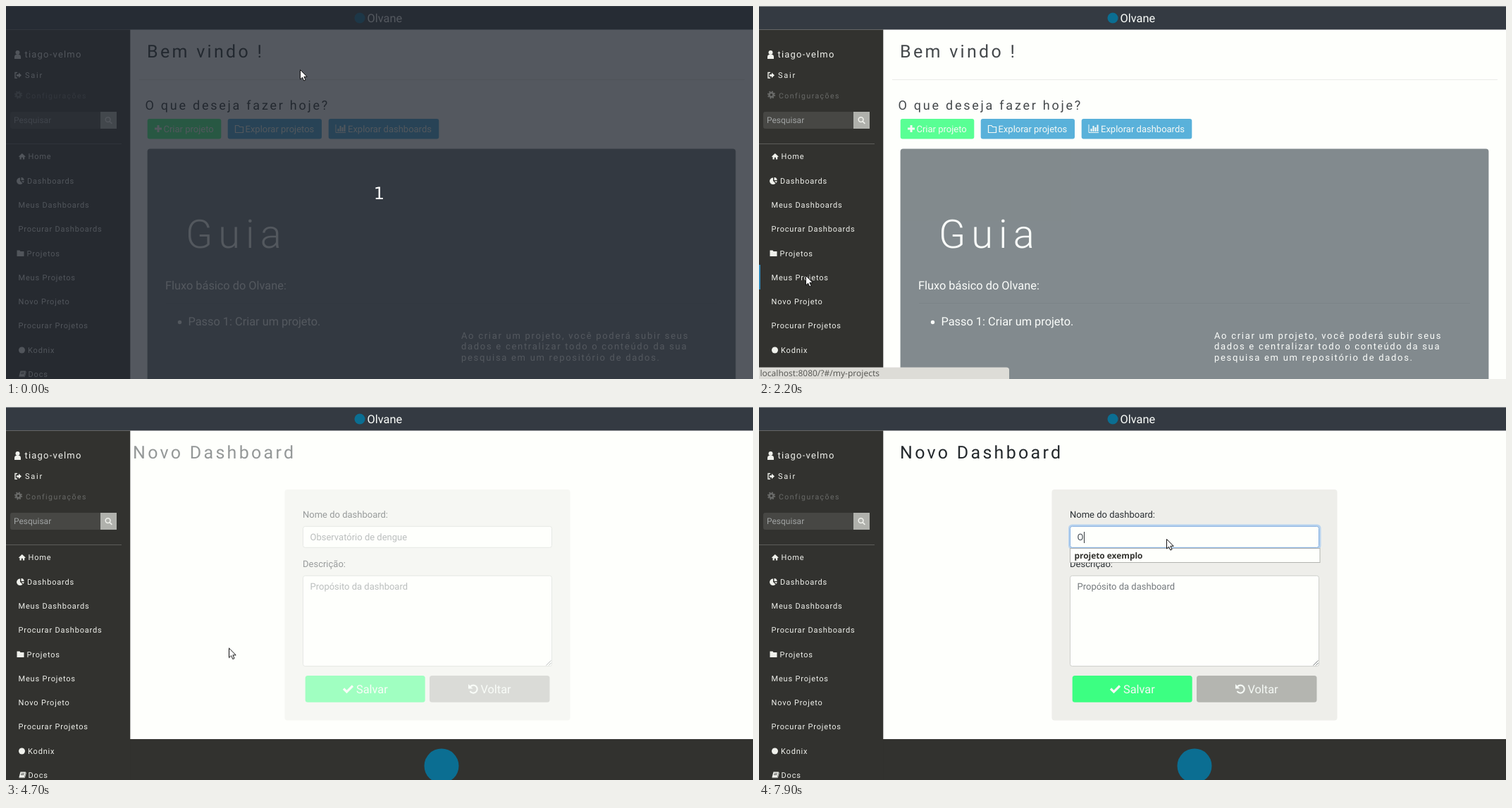
Write an HTML page that moves like this. It is 1060x529 px and loops after 8000 ms.

```html
<!DOCTYPE html>
<html lang="pt">
<head>
<meta charset="utf-8">
<title>Olvane</title>
<style>
html, body { margin: 0; width: 100%; height: 100%; overflow: hidden; background: #fefffc; }
svg { display: block; width: 1060px; height: 529px; }
text { font: 13px Roboto, sans-serif; white-space: pre; text-rendering: geometricPrecision; }

.title { font-size: 25px; letter-spacing: 3.3px; fill: #23282c; }
.sub { font-size: 18px; letter-spacing: 2.75px; fill: #23282c; }
.guide { font-size: 56px; font-weight: 350; letter-spacing: 8px; }
.lead { font-size: 16.35px; }
.note { letter-spacing: 1.71px; }
.small { font-size: 11.375px; }
.head { font-size: 15.5px; letter-spacing: 2.15px; fill: #23282c; }
.nav text { font-size: 11px; letter-spacing: .82px; }
.status text { font: 12px "Noto Sans", sans-serif; fill: #5b5b57; }
.hint { fill: #74797d; }
.body { fill: #2b3034; }
.rule { stroke: #e8e9e5; }
.light { fill: #f4f8f4; color: #f4f8f4; }
.blue { fill: #3ca3d4; }
.green { fill: #3cff82; }
.edit { fill: var(--edit, #3ca3d4); }
.make { fill: var(--make, #3ca3d4); }

/* one loop is 8 s, so 100 ms is 1.25% */
.a { animation: 8s step-end infinite; }
.dim { animation-name: dim; }
.cursor { animation-name: cursor; }
.home { animation-name: home; }
.list { animation-name: list; }
.form { animation-name: form; }
.footer { animation-name: footer; }
.bar { animation-name: bar; }
.status { animation-name: status; }
.urlA { animation-name: urlA; }
.urlB { animation-name: urlB; }
.urlC { animation-name: urlC; }
.first { animation-name: hover; }
.focus { animation-name: focus; }
.drop { animation-name: drop; }
.caret { animation-name: caret; }
.ghost { animation-name: ghost; }
.typed { animation-name: typed; }

@keyframes dim { 0% { opacity: 1 } 3.75% { opacity: .75 } 5% { opacity: .5 } 6.25% { opacity: .25 } 7.5%, 100% { opacity: 0 } }
@keyframes home { 0% { opacity: 1 } 27.5% { opacity: .85 } 32.5%, 100% { opacity: 0 } }
@keyframes list {
  0% { opacity: 0 }
  32.5% { opacity: .2; transform: translateX(-28px) }
  33.75% { opacity: .5; transform: translateX(-18px) }
  35% { opacity: .78; transform: translateX(-8.3px) }
  36.25% { opacity: .94; transform: translateX(-2px) }
  37.5% { opacity: 1; transform: none }
  56.25% { opacity: .6; transform: none }
  57.5%, 100% { opacity: 0 }
}
@keyframes form {
  0% { opacity: 0 }
  57.5% { opacity: .18; transform: translateX(-30px) }
  58.75% { opacity: .48; transform: translateX(-20px) }
  60% { opacity: .78; transform: translateX(-8px) }
  61.25% { opacity: .94; transform: translateX(-2px) }
  62.5%, 100% { opacity: 1; transform: none }
}
@keyframes footer { 0% { opacity: 0 } 57.5%, 100% { opacity: 1 } }
@keyframes bar {
  0% { opacity: 0 }
  15% { opacity: 1; transform: translateY(402px) }
  22.5% { opacity: 1; transform: translateY(367px) }
  37.5%, 100% { opacity: 0 }
}
@keyframes status {
  0% { opacity: 0 } 16.25% { opacity: .45 } 17.5% { opacity: .8 } 18.75% { opacity: .95 } 20% { opacity: 1 }
  37.5% { opacity: .5 } 38.75% { opacity: 0 } 42.5% { opacity: 1 } 56.25%, 100% { opacity: 0 }
}
@keyframes urlA { 0% { opacity: 1 } 27.5%, 100% { opacity: 0 } }
@keyframes urlB { 0% { opacity: 0 } 27.5% { opacity: 1 } 40%, 100% { opacity: 0 } }
@keyframes urlC { 0% { opacity: 0 } 40%, 100% { opacity: 1 } }
@keyframes hover {
  0% { --edit: #3ca3d4; --make: #3ca3d4 }
  41.25% { --edit: #2a779d; --make: #3ca3d4 }
  42.5% { --edit: #338db9; --make: #338db9 }
  43.75%, 100% { --edit: #3ca3d4; --make: #2a779d }
}
@keyframes focus { 0% { opacity: 0 } 72.5% { opacity: .6 } 73.75%, 100% { opacity: 1 } }
@keyframes drop { 0% { opacity: 0 } 75%, 100% { opacity: 1 } }
@keyframes caret {
  0% { opacity: 0 } 72.5% { opacity: 1 } 80% { opacity: 0 } 87.5% { opacity: 1 } 95% { opacity: 0; transform: none }
  98.75%, 100% { opacity: 1; transform: translateX(9px) }
}
@keyframes ghost { 0% { opacity: 1 } 98.75%, 100% { opacity: 0 } }
@keyframes typed { 0% { opacity: 0 } 98.75%, 100% { opacity: 1 } }
@keyframes cursor {
  0% { transform: translate(417px, 90px) }
  3.75% { transform: translate(400px, 110px) }
  5% { transform: translate(370px, 150px) }
  6.25% { transform: translate(335px, 190px) }
  7.5% { transform: translate(305px, 226px) }
  10% { transform: translate(280px, 250px) }
  11.25% { transform: translate(236px, 292px) }
  12.5% { transform: translate(188px, 333px) }
  13.75% { transform: translate(138px, 370px) }
  15% { transform: translate(98px, 402px) }
  16.25% { transform: translate(70px, 418px) }
  17.5% { transform: translate(59.5px, 421.5px) }
  21.25% { transform: translate(60px, 413px) }
  22.5% { transform: translate(63px, 397px) }
  23.75% { transform: translate(65px, 386px) }
  25% { transform: translate(66px, 382px) }
  32.5% { transform: translate(69px, 381px) }
  33.75% { transform: translate(78px, 380px) }
  35% { transform: translate(91.5px, 378.5px) }
  36.25% { transform: translate(115px, 375px) }
  37.5% { transform: translate(155px, 367px) }
  38.75% { transform: translate(198px, 357px) }
  40% { transform: translate(232px, 348px) }
  41.25% { transform: translate(260px, 341px) }
  42.5% { transform: translate(284px, 337px) }
  43.75% { transform: translate(294px, 338px) }
  45% { transform: translate(302px, 339px) }
  46.25% { transform: translate(308px, 340px) }
  47.5% { transform: translate(312px, 341px) }
  48.75% { transform: translate(315px, 341.5px) }
  50% { transform: translate(316px, 341.5px) }
  62.5% { transform: translate(319px, 340px) }
  63.75% { transform: translate(330px, 334px) }
  65% { transform: translate(352px, 322px) }
  66.25% { transform: translate(382px, 304px) }
  67.5% { transform: translate(497px, 234px) }
  70% { transform: translate(522px, 214px) }
  71.25% { transform: translate(542px, 200px) }
  72.5% { transform: translate(553px, 194px) }
  75% { transform: translate(556px, 193px) }
  77.5% { transform: translate(557px, 198px) }
  80% { transform: translate(561px, 197px) }
  81.25% { transform: translate(566px, 194px) }
  82.5% { transform: translate(571px, 190px) }
  83.75% { transform: translate(574px, 188px) }
  85% { transform: translate(576px, 187px) }
  87.5%, 100% { transform: translate(578px, 187px) }
}
</style>
</head>
<body>
<svg viewBox="0 0 1060 529">
  <defs>
    <!-- icons sit in a 12 by 12 box -->
    <g id="search" fill="none" stroke="currentColor" stroke-width="1.7"><circle cx="5" cy="5" r="3.7"/><path d="M7.7 7.7 11.3 11.3"/></g>
    <path id="pencil" fill="currentColor" d="M1 11 1.6 8 8 1.6 10.4 4 4 10.4ZM8.7 1 9.6.2 11.8 2.4 11 3.3Z"/>
    <path id="folder" fill="currentColor" d="M0 2H4L5 3.5H10V10.5H0Z"/>
    <g id="trash" fill="currentColor"><path d="M0 2H3L4 .5H6L7 2H10V3.2H0Z"/><path d="M1 4H9V11.5H1ZM2.8 5V10.3H3.6V5ZM4.6 5V10.3H5.4V5ZM6.4 5V10.3H7.2V5Z" fill-rule="evenodd"/></g>
    <g id="card">
      <rect x="189" y="236.5" width="428.5" height="162.500" rx="3" fill="none" stroke="#dcddd9"/>
      <path d="M201.500 237H604.700V276H201.500Z" fill="#f6f6f3"/>
      <path d="M201.500 276.5H604.700" stroke="#dadbd7"/>
      <text class="head" x="217" y="262.5">projeto exemplo</text>
      <text class="body" x="217.5" y="307">sua descrição aqui</text>
      <rect class="edit" x="218" y="326" width="54.5" height="24.5" rx="2.5"/>
      <rect class="make" x="276" y="326" width="107.5" height="24.5" rx="2.5"/>
      <rect class="blue" x="387" y="326" width="76.5" height="24.5" rx="2.5"/>
      <rect x="467" y="326" width="59" height="24.5" rx="2.5" fill="#ca2545"/>
      <g class="light">
        <use href="#pencil" transform="translate(224 333) scale(.88)"/>
        <use href="#pencil" transform="translate(282 333) scale(.88)"/>
        <use href="#search" transform="translate(393.5 333) scale(.88)"/>
        <use href="#trash" transform="translate(474 333) scale(.88)"/>
        <text class="small" x="236.5" y="342">Editar</text>
        <text class="small" x="295" y="342">Criar Dashboard</text>
        <text class="small" x="407" y="342">Visualizar</text>
        <text class="small" x="485" y="342">Excluir</text>
      </g>
      <g color="#2f8fcb">
        <path d="M236 361.5H229.5V371H239V367.5" fill="none" stroke="currentColor" stroke-width="1.3"/>
        <use href="#pencil" transform="translate(232 360) scale(.8)"/>
        <text x="244.5" y="371" fill="#2f8fcb">Importar</text>
      </g>
    </g>
  </defs>

  <rect width="1060" height="529" fill="#fefffc"/>

  <g class="a home">
    <text class="title" x="200" y="72.5">Bem vindo !</text>
    <path class="rule" d="M189 104.5H1048"/>
    <text class="sub" x="197.5" y="146.5">O que deseja fazer hoje?</text>
    <rect class="green" x="200.7" y="160" width="104.6" height="28.6" rx="3"/>
    <rect class="blue" x="314.7" y="160" width="133.3" height="28.6" rx="3"/>
    <rect class="blue" x="457.7" y="160" width="156.6" height="28.6" rx="3"/>
    <g class="light">
      <path d="M211 174H221M216 169V179" stroke="currentColor" stroke-width="3"/>
      <path d="M325.5 169.5H330L331.5 171.5H336.5V179.5H325.5Z" fill="none" stroke="currentColor" stroke-width="1.2"/>
      <path d="M468 168V179.5H482" fill="none" stroke="currentColor"/>
      <path d="M471.5 178V174M474.5 178V170M477.5 178V172M480.5 178V168.5" stroke="currentColor" stroke-width="2"/>
      <text x="223.5" y="178.7">Criar projeto</text>
      <text x="339.5" y="178.7">Explorar projetos</text>
      <text x="485" y="178.7">Explorar dashboards</text>
    </g>
    <rect x="200.6" y="202.6" width="834.8" height="340" rx="4" fill="#6c757a"/>
    <path d="M227 421.5H1009" stroke="#656e73"/>
    <g fill="#fafdfa">
      <text class="guide" x="255" y="342.5">Guia</text>
      <text class="lead" x="226" y="401.7">Fluxo básico do Olvane:</text>
      <circle cx="246.5" cy="448.5" r="2.7"/>
      <text class="lead" x="258.5" y="453">Passo 1: Criar um projeto.</text>
      <text class="note" x="646" y="471.7">Ao criar um projeto, você poderá subir seus</text>
      <text class="note" x="646" y="487.2">dados e centralizar todo o conteúdo da sua</text>
      <text class="note" x="646" y="502.7">pesquisa em um repositório de dados.</text>
    </g>
  </g>

  <g class="a list" opacity="0">
    <text class="title" x="200" y="72.5">Meus Projetos</text>
    <path class="rule" d="M189 104.5H1048M189 118.5H1048M189 170.5H1048"/>
    <rect x="201" y="131.5" width="774" height="25" rx="2.5" fill="#fefffc" stroke="#ced0cc"/>
    <text class="small hint" x="207.5" y="148">Pesquise por seus projetos</text>
    <path class="green" d="M973.5 131H1032.5Q1035.5 131 1035.5 134V154Q1035.5 157 1032.5 157H973.5Z"/>
    <g class="light">
      <use href="#search" transform="translate(980.5 138.5) scale(.9)"/>
      <text class="small" x="993" y="148">Buscar</text>
    </g>
    <use class="a first" href="#card"/>
    <use href="#card" y="163.3"/>
  </g>

  <g class="a form" opacity="0">
    <text class="title" x="200" y="72.5">Novo Dashboard</text>
    <rect x="415.5" y="117" width="405" height="327.5" rx="4" fill="#eeeeea"/>
    <text class="body" x="441" y="157">Nome do dashboard:</text>
    <text class="body" x="441" y="227">Descrição:</text>
    <rect x="441.5" y="169.3" width="353" height="30" rx="3" fill="#fefffc" stroke="#ced0cc"/>
    <rect x="441.5" y="239.3" width="353" height="128.3" rx="3" fill="#fefffc" stroke="#ced0cc"/>
    <path d="M786.5 366.5 793.5 359.5M790 366.5 793.5 363" stroke="#777b7d"/>
    <g class="a focus" opacity="0">
      <rect x="440.5" y="168" width="355.5" height="32.500" rx="4" fill="none" stroke="#b8d3ef" stroke-width="3"/>
      <rect x="441.5" y="169.3" width="353" height="30" rx="3" fill="#fefffc" stroke="#82aee0"/>
    </g>
    <text class="a ghost hint" x="451.5" y="188.7">Observatório de dengue</text>
    <text class="a typed" x="451.5" y="188.7" fill="#495057">O</text>
    <path class="a caret" d="M452.5 177V193" stroke="#33383c"/>
    <text class="hint" x="451.5" y="258.7">Propósito da dashboard</text>
    <rect class="green" x="444.7" y="381" width="170" height="37.7" rx="3.5"/>
    <rect x="621" y="381" width="170.5" height="37.7" rx="3.5" fill="#b4b5b0"/>
    <g class="light" fill="#eef8ee">
      <path d="M499 399.5 503.5 404 512 395.5" fill="none" stroke="currentColor" stroke-width="3.2"/>
      <path d="M679 396.5A5.5 5.5 0 1 1 678.5 403" fill="none" stroke="currentColor" stroke-width="2.2"/>
      <path d="M676 393V399.5H682.5Z" fill="currentColor"/>
      <text class="lead" x="517" y="405.7">Salvar</text>
      <text class="lead" x="693.5" y="405.7">Voltar</text>
    </g>
    <g class="a drop" opacity="0">
      <rect x="441.5" y="200.5" width="354.5" height="20" fill="#fefffc" stroke="#b3b4b0"/>
      <text x="447.5" y="214.7" fill="#33332f" style="font: bold 11.9px 'Noto Sans', sans-serif">projeto exemplo</text>
    </g>
  </g>

  <g class="a footer" opacity="0">
    <rect x="176" y="471" width="884" height="58" fill="#32322f"/>
    <circle cx="618" cy="509" r="24.5" fill="#0b6e92"/>
  </g>

  <rect width="1060" height="33.5" fill="#343a42"/>
  <path d="M0 .5H1060" stroke="#8d9296"/>
  <circle cx="502" cy="17" r="7.5" fill="#0b6e92"/>
  <text class="lead" x="512.5" y="22.7" fill="#fafdfa">Olvane</text>

  <rect y="33.5" width="176.3" height="496" fill="#32322f"/>
  <g fill="#f0f1ec" color="#f0f1ec">
    <circle cx="16.5" cy="66" r="3"/>
    <path d="M12 75V72Q12 69.5 14 69H19Q21 69.5 21 72V75Z"/>
    <text x="26.5" y="73" letter-spacing="1.2">tiago-velmo</text>
    <path d="M16 94.5H13V102H16" fill="none" stroke="currentColor" stroke-width="1.4"/>
    <path d="M15 97H18V94.5L22 98.3 18 102V99.7H15Z"/>
    <text x="27" y="102" style="font-size: 11px; letter-spacing: 1.8px">Sair</text>
    <g fill="#696a68">
      <circle cx="17.5" cy="126" r="3" fill="none" stroke="#696a68" stroke-width="2.6"/>
      <circle cx="17.5" cy="126" r="4.8" fill="none" stroke="#696a68" stroke-width="1.7" stroke-dasharray="1.885"/>
      <text x="28" y="130.7" style="font-size: 10.5px; letter-spacing: 1.45px">Configurações</text>
    </g>
    <path d="M134 150H9Q6 150 6 153V171Q6 174 9 174H134Z" fill="#474744"/>
    <path d="M134 150H157V174H134Z" fill="#b0b1ac"/>
    <text x="11" y="166" fill="#a0a3a3" style="font-size: 12px">Pesquisar</text>
    <use href="#search" transform="translate(140 156.500) scale(.92)"/>
    <path d="M0 195.5H164" stroke="#5c5c59"/>
    <g class="nav">
      <path d="M18 213.5 22.8 209 27.7 213.5 27 214.3 26.2 213.8V217.5H23.9V214.8H21.8V217.5H19.5V213.8L18.7 214.3Z"/>
      <text x="31.5" y="217">Home</text>
      <path d="M20 243.5V248L23.5 251.5A4.8 4.8 0 1 1 20 243.5ZM21.5 243A4.5 4.5 0 0 1 25.7 247H21.5ZM22 248.2H25.7A4.5 4.5 0 0 1 24.5 250.800Z"/>
      <text x="30" y="251.5">Dashboards</text>
      <text x="17.5" y="286">Meus Dashboards</text>
      <text x="17.5" y="320">Procurar Dashboards</text>
      <use href="#folder" x="15.5" y="344.5"/>
      <text x="29.5" y="354.5">Projetos</text>
      <text x="17.5" y="388.7">Meus Projetos</text>
      <text x="17.5" y="423">Novo Projeto</text>
      <text x="17.5" y="457.3">Procurar Projetos</text>
      <circle cx="22.5" cy="488" r="4.5"/>
      <text x="31" y="491.7">Kodnix</text>
      <path d="M20.5 517.5H28L26 525H18.5Z"/>
      <path d="M21.5 519.7H26M21 521.5H25.5" stroke="#32322f" stroke-width=".8"/>
      <path d="M18.5 525.7H26.5L28.5 518.5" fill="none" stroke="currentColor" stroke-width=".8"/>
      <text x="31.5" y="526">Docs</text>
    </g>
  </g>
  <rect class="a bar" width="2" height="35" fill="#2f86b5" opacity="0"/>

  <g class="a status" opacity="0">
    <path d="M0 512.5H351Q355 512.5 355 516V529H0Z" fill="#dddcd7"/>
    <text class="a urlA" x="1.5" y="525">localhost:8080/?#/projects/new</text>
    <text class="a urlB" x="1.5" y="525">localhost:8080/?#/my-projects</text>
    <text class="a urlC" x="1.5" y="525">localhost:8080/?#/dashboards/new</text>
  </g>

  <g class="a dim">
    <rect width="1060" height="529" fill="#242832" opacity=".775"/>
    <text x="529.5" y="273.5" text-anchor="middle" fill="#fff" style="font: 24px 'DejaVu Sans', sans-serif">1</text>
  </g>

  <path class="a cursor" d="M.5 .5V14L3.6 11.2 5.8 16 8.1 15 5.9 10.3H10.2Z" fill="#fff" stroke="#111"/>
</svg>
</body>
</html>
```
